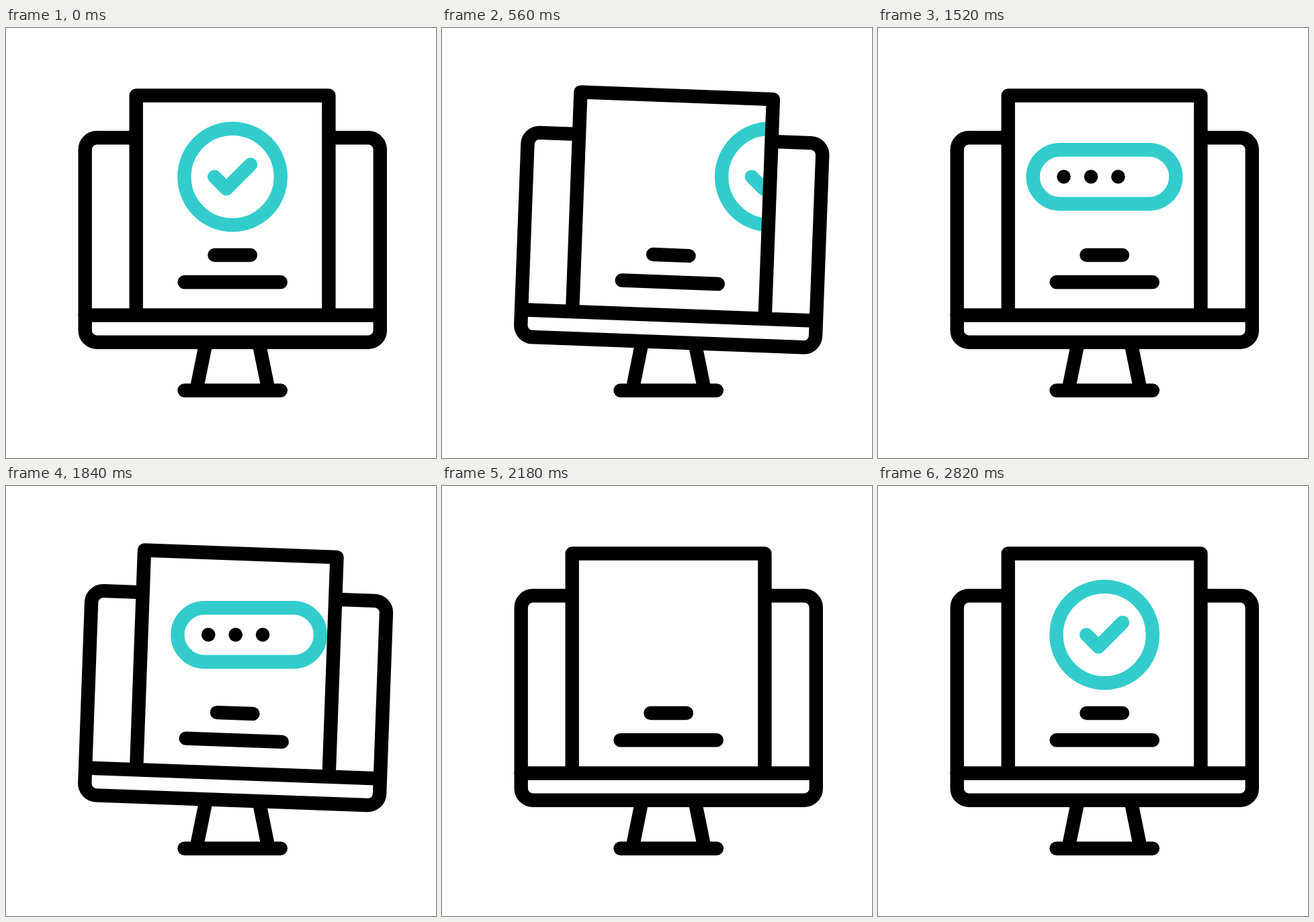
Animation, 640 px wide and 640 px high, one loop 3 s. Source, as an HTML page with a canvas:

```html
<!DOCTYPE html>
<html lang="en">
<head>
<meta charset="utf-8">
<title>Monitor check</title>
<style>
html, body { margin: 0; background: #fff; overflow: hidden; }
canvas { display: block; }
</style>
</head>
<body>
<canvas width="640" height="640"></canvas>
<script>
const ctx = document.querySelector('canvas').getContext('2d');
const TEAL = '#3cc';
const LOOP = 3000, SWAPS = [200, 1700], CROSS = 463;
const DOTS = [[276.5, 1100], [317, 1320], [357.4, 1520]];
const CHECK = 'M310.2 221.4L328 239.2L364 203.2', CHECK_LENGTH = 76.1;

const clamp = (v, lo = 0, hi = 1) => Math.min(hi, Math.max(lo, v));
const smooth = s => s * s * (3 - 2 * s);

function stroke(path, color = '#000') {
  ctx.strokeStyle = color;
  ctx.stroke(new Path2D(path));
}

function box(x, y, w, h, r, color) {
  ctx.beginPath();
  ctx.roundRect(x, y, w, h, r);
  ctx.strokeStyle = color;
  ctx.stroke();
}

// Body tilt in radians, u ms after a swap begins
function tilt(u) {
  const s = clamp(1 - Math.abs(u - 252) / 200);
  return smooth(s) * 5 * Math.PI / 180;
}

// Leaves to the right speeding up, arrives from the left slowing down
function slide(u) {
  return u < CROSS
    ? 31.5 * (Math.max(u, 0) / 160) ** 1.924
    : -0.00147 * Math.max(873 - u, 0) ** 2;
}

function rotate(angle) {
  ctx.translate(337, 435);
  ctx.rotate(angle);
  ctx.translate(-337, -435);
}

function badge(t) {
  box(265.4, 149.8, 143.4, 143.4, 71.7, TEAL);
  const drawn = t < SWAPS[1] ? 1 : clamp((t - 2580) / 240);
  if (!drawn) return;
  ctx.setLineDash([drawn * CHECK_LENGTH, 200]);
  stroke(CHECK, TEAL);
  ctx.setLineDash([]);
}

function field(t) {
  box(230.7, 181.2, 212.6, 80.6, 40.3, TEAL);
  ctx.fillStyle = '#000';
  for (const [x, start] of DOTS) {
    if (t < start) continue;
    ctx.beginPath();
    ctx.arc(x, 221.4, 10.3, 0, 7);
    ctx.fill();
  }
}

function draw(t) {
  const second = t >= SWAPS[1];
  const u = t - SWAPS[+second];
  const angle = tilt(u);
  const showBadge = second === (u >= CROSS);

  ctx.fillStyle = '#fff';
  ctx.fillRect(0, 0, 640, 640);
  ctx.lineWidth = 20.4;
  ctx.lineJoin = 'round';

  // Stand
  ctx.lineCap = 'butt';
  stroke('M297.7 468L283.2 539.5M376.3 468L390.8 539.5');
  ctx.lineCap = 'round';
  stroke('M265.5 539.5H408.8');

  // Screen and paper
  ctx.save();
  rotate(angle);
  box(117.7, 163.3, 439.1, 304.4, 17.5, '#000');
  ctx.fillStyle = '#fff';
  ctx.fillRect(193.7, 100.5, 286.7, 327);
  stroke('M310.4 338H363.9M265.5 378.2H408.8');
  ctx.restore();

  // Content slides level, cut off by the tilted paper
  ctx.save();
  rotate(angle);
  ctx.beginPath();
  ctx.rect(193.7, 100.5, 286.7, 327);
  ctx.clip();
  ctx.setTransform(1, 0, 0, 1, slide(u), 0);
  (showBadge ? badge : field)(t);
  ctx.restore();

  ctx.save();
  rotate(angle);
  stroke('M193.7 427.5V100.5H480.4V427.5M117.7 427.5H556.8');
  ctx.restore();
}

function tick() {
  draw(performance.now() % LOOP);
  requestAnimationFrame(tick);
}
tick();
</script>
</body>
</html>
```
